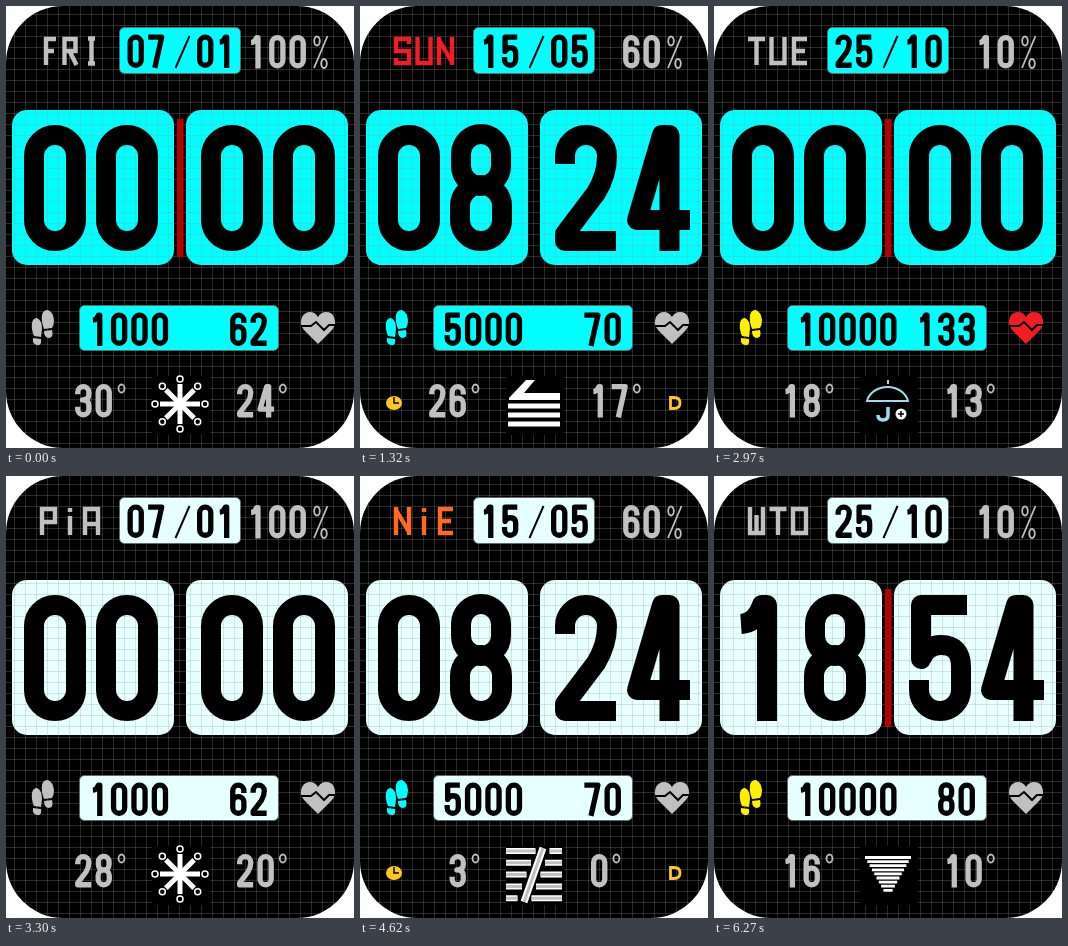
Recreate the animation shown at these times as an HTML page. Size 348 px wide and 442 px high, loop 6.6 s.

```html
<!DOCTYPE html>
<html lang="en">
<head>
<meta charset="utf-8">
<title>Watch face</title>
<style>
html, body { margin: 0; width: 100%; height: 100%; overflow: hidden; background: #fff; }
svg { display: block; width: 348px; height: 442px; }
</style>
</head>
<body>
<svg id="face" viewBox="0 0 348 442" role="img" fill="none">
  <defs>
    <pattern id="grid" width="11" height="11" patternUnits="userSpaceOnUse">
      <path d="M0 8.5H11M8.5 0V11" stroke="#999" stroke-opacity=".27"/>
    </pattern>
  </defs>
  <rect width="348" height="442" rx="57" fill="#000"/>
  <g id="panels">
    <rect x="6" y="104" width="162" height="155" rx="15"/>
    <rect x="180" y="104" width="162" height="155" rx="15"/>
  </g>
  <rect width="348" height="442" rx="57" fill="url(#grid)"/>
  <g id="boxes" stroke="#666">
    <rect x="113.5" y="21.5" width="121" height="46" rx="5"/>
    <rect x="73.5" y="299.5" width="199" height="45" rx="5"/>
  </g>
  <rect x="146" y="370" width="58" height="59" fill="#000"/>
  <g id="live"></g>
</svg>
<script>
const STEP = 330, COUNT = 20;
const GREY = '#c0c0c0', RED = '#f21c24', YELLOW = '#ffc81e';
const $ = id => document.getElementById(id);

// Digit skeletons in a 62 x 126 cell, drawn with a 20 unit pen
const DIGITS = {
  0: 'M10 31A21 21 0 0 1 52 31V95A21 21 0 0 1 10 95Z',
  1: 'M9 29Q24 28 30 10H35V126',
  2: 'M10 39V31A21 21 0 0 1 52 31Q52 50 41 68L10 109V116H61',
  3: 'M10 39V31A21 21 0 0 1 52 31V40Q52 60 28 60Q52 60 52 82V95A21 21 0 0 1 10 95V86',
  4: 'M42.5 126V10H35L10 95H63',
  5: 'M58 10H12V64Q18 50 32 50Q52 50 52 72V95A21 21 0 0 1 10 95V85',
  6: 'M52 40V31A21 21 0 0 0 10 31V95A21 21 0 0 0 52 95V74A21 21 0 0 0 10 74',
  7: 'M1 10H52L26 126',
  8: 'M11 29A20 20 0 0 1 51 29V41A20 20 0 0 1 11 41ZM10 81A21 21 0 0 1 52 81V95A21 21 0 0 1 10 95Z',
  9: 'M10 86V95A21 21 0 0 0 52 95V31A21 21 0 0 0 10 31V52A21 21 0 0 0 52 52',
  '-': 'M2 70H32'
};

// Letter skeletons in a 17 x 28 cell
const LETTERS = {
  A: 'M2 28V17H15V28M2 17V2H15V17',
  D: 'M3 2H9Q14 2 14 8V20Q14 26 9 26H3Z',
  E: 'M16 2H3V26H16M3 14H14',
  F: 'M16 2H6V28M6 14H14',
  I: 'M8.5 0V28M5 1.5H12M5 26.5H12',
  N: 'M2 28V0M2 3L15 25M15 28V0',
  O: 'M2 2H15V26H2Z',
  P: 'M2 28V2H15V15H2',
  R: 'M3 28V2H14V14H3M8 14L15 28',
  S: 'M15 7V2H2V14H15V26H2V21',
  T: 'M0 2H17M8.5 2V28',
  U: 'M2 0V26H15V0',
  W: 'M2 0V26H15V0M8.5 8V26',
  i: 'M8.5 9V28M8.5 1V5'
};

const path = (d, color, width = 2, extra = '') =>
  `<path d="${d}" stroke="${color}" stroke-width="${width}" ${extra}/>`;
const shape = (d, color) => `<path d="${d}" fill="${color}"/>`;
const oval = (x, y, rx, ry, color, width) =>
  `<ellipse cx="${x}" cy="${y}" rx="${rx}" ry="${ry}" stroke="${color}" stroke-width="${width}"/>`;
const dot = (x, y, r, fill) => `<circle cx="${x}" cy="${y}" r="${r}" fill="${fill}"/>`;
const ring = (x, y, r, color) => oval(x, y, r, r, color, 1.5);
const pad = n => String(n).padStart(2, '0');
const range = n => Array.from({ length: n }, (_, i) => i);

function digits(text, x, y, color, scale = 0.265, advance = 20.4) {
  return [...String(text)].map(c => {
    const out = `<g transform="translate(${x} ${y}) scale(${scale})">` +
      path(DIGITS[c], color, 20, 'stroke-linejoin="round"') + '</g>';
    x += c === '-' ? advance / 2 : advance;
    return out;
  }).join('');
}
const digitsEnd = (text, last, y, color) =>
  digits(text, last - 20.4 * (String(text).length - 1), y, color);
const big = (n, x) => digits(pad(n), x, 119, '#000', 1, 72);

const word = (text, color) => [...text].map((c, i) =>
  `<g transform="translate(${34 + i * 21.5} 31)">${path(LETTERS[c], color, 4.4)}</g>`).join('');

const bars = (list, color, width) =>
  path(list.map(([a, b, y]) => `M${a} ${y}H${b}`).join(''), color, width);

const WEATHER = {
  sun() {
    return range(8).map(i => {
      const a = i * Math.PI / 4, c = Math.cos(a), s = Math.sin(a);
      return path(`M174 398L${174 + 20 * c} ${398 + 20 * s}`, '#fff', 5) +
        ring(174 + 25 * c, 398 + 25 * s, 3, '#fff');
    }).join('');
  },
  cloud() {
    return shape('M149 392L166 374H175L164 387H200V394H149Z', '#fff') +
      bars([[148, 200, 400], [148, 200, 409], [148, 200, 418]], '#fff', 5);
  },
  fog() {
    const rows = range(5).flatMap(i => {
      const y = 375 + i * 11.8, mid = 182.5 - i * 4.5;
      return [[146, mid - 7, y], [mid + 7, 202, y]];
    });
    return bars(rows, '#fff', 6) + bars(rows, GREY, 3) +
      path('M183 372L164 426', '#fff', 7) + path('M183 372L164 426', GREY, 3);
  },
  umbrella() {
    const c = '#9cdcec';
    return path('M153 395A21 18 0 0 1 194 395ZM174 374V378', c, 2) +
      path('M174 401V409Q174 414 169 414Q164 414 164 409', c, 3.5) +
      dot(187, 408, 5.5, '#fff') + path('M184 408H190M187 405V411', '#000', 1.5);
  },
  rain() {
    const front = 'M163 404Q161 397 167 391Q173 385 180 385Q195 386 199 404Z';
    return shape('M149 390Q153 376 167 376Q179 376 184 385L160 391Z', '#fff') +
      path(front, '#000', 7) + shape(front, '#fff') +
      [168, 180, 192].map(x => ring(x, 413.5, 2.5, '#fff')).join('');
  },
  tornado() {
    return bars(range(9).map(i => [151 + i * 2.3, 197 - i * 2.3, 381.5 + i * 4.1]), '#fff', 2.8);
  }
};

// Sky, high and low for every step
const SKY = ('sun 30 24,fog 12 5,cloud 22 15,rain 17 11,cloud 26 17,rain 15 8,umbrella 14 7,' +
  'fog 9 0,rain 11 4,umbrella 18 13,sun 28 20,rain 4 -3,rain 1 -7,tornado 14 8,fog 3 0,' +
  'tornado 12 6,rain 7 2,umbrella 13 9,umbrella 15 11,tornado 16 10').split(',').map(s => s.split(' '));

const DAYS = [
  ['SUN', 'MON', 'TUE', 'WED', 'THU', 'FRI', 'SAT'],
  ['NiE', 'PON', 'WTO', 'SRO', 'CZW', 'PiA', 'SOB']
];
const FEET = [GREY, '#2878ff', '#28c8ff', '#28e6ff', '#00ffff', '#28ffa0', '#78ff28', '#fff000'];

const feet = c =>
  shape('M36 309Q37 304 42 304Q47 306 48 314Q48 319 46 322L38 323Q35 315 36 309Z' +
    'M38 325L46 324Q48 331 43 332Q38 332 38 325Z' +
    'M26 317Q27 312 31 312Q36 314 36 323L35 331L28 330Q25 323 26 317Z' +
    'M27 332L35 333Q36 340 31 339Q26 338 27 332Z', c);
const heart = c =>
  shape('M312 338L298 324Q293 318 296 311Q299 306 304 306Q309 306 312 311Q315 306 320 306' +
    'Q326 306 328 311Q331 318 326 324Z', c) +
  path('M295 320H305L310 316L318 324L323 319H330', '#000', 2);
const alarm = () => `<ellipse cx="34" cy="397" rx="8" ry="7" fill="${YELLOW}"/>` +
  path('M34 391V397H39', '#000', 1.5);
const quiet = () => path('M310.5 391.5H314Q320 391.5 320 397Q320 402.5 314 402.5H310.5Z', YELLOW, 2.8);
const degree = x => oval(x, 382.5, 3, 4, GREY, 1.8);
const percent = () => path('M321.5 30L308 62', GREY, 1.8) +
  oval(311, 35, 2.8, 4.5, GREY, 1.8) + oval(318, 57.5, 2.8, 4.5, GREY, 1.8);

function render(n) {
  const half = n < 10 ? 0 : 1, k = n % 10;
  const alert = n === 9;
  const day = 7 + 2 * k, month = 1 + k;
  const weekday = new Date(2022, month - 1, day).getDay();
  const dayColor = weekday ? GREY : half ? '#ff6a1e' : RED;
  const [sky, high, low] = SKY[n];
  const lowEnd = 231 + [...low].reduce((w, c) => w + (c === '-' ? 10.2 : 20.4), 0);
  const accent = half ? '#e6ffff' : '#00ffff';

  $('panels').setAttribute('fill', accent);
  $('boxes').setAttribute('fill', accent);
  $('live').innerHTML = [
    word(DAYS[half][weekday], dayColor),
    digits(pad(day), 121.5, 28.5, '#000'),
    path('M183.5 30L169.5 62', '#000', 2),
    digits(pad(month), 191, 28.5, '#000'),
    digitsEnd(100 - 10 * k, 283.5, 29, GREY), percent(),
    big(alert ? 0 : 2 * k, 18), big(alert ? 0 : 6 * k, 195),
    n === 0 || n % 2 ? '<rect x="171" y="113" width="6.5" height="138" fill="#b40000"/>' : '',
    feet(FEET[Math.min(k, 7)]), heart(alert ? RED : GREY),
    digits(1000 * (k + 1), 84.5, 306.5, '#000'),
    digitsEnd(alert ? 133 : 62 + 2 * k, 244.5, 306.5, '#000'),
    k > 2 && k < 7 ? alarm() : '',
    k > 2 && k < 8 ? quiet() : '',
    digitsEnd(high, 89.5, 378, GREY), degree(115.5),
    WEATHER[sky](),
    digits(low, 231, 378, GREY), degree(lowEnd + 5)
  ].join('');
}

let shown = -1;
function tick() {
  const n = Math.floor(performance.now() / STEP) % COUNT;
  if (n !== shown) render(shown = n);
  requestAnimationFrame(tick);
}
tick();
</script>
</body>
</html>
```
